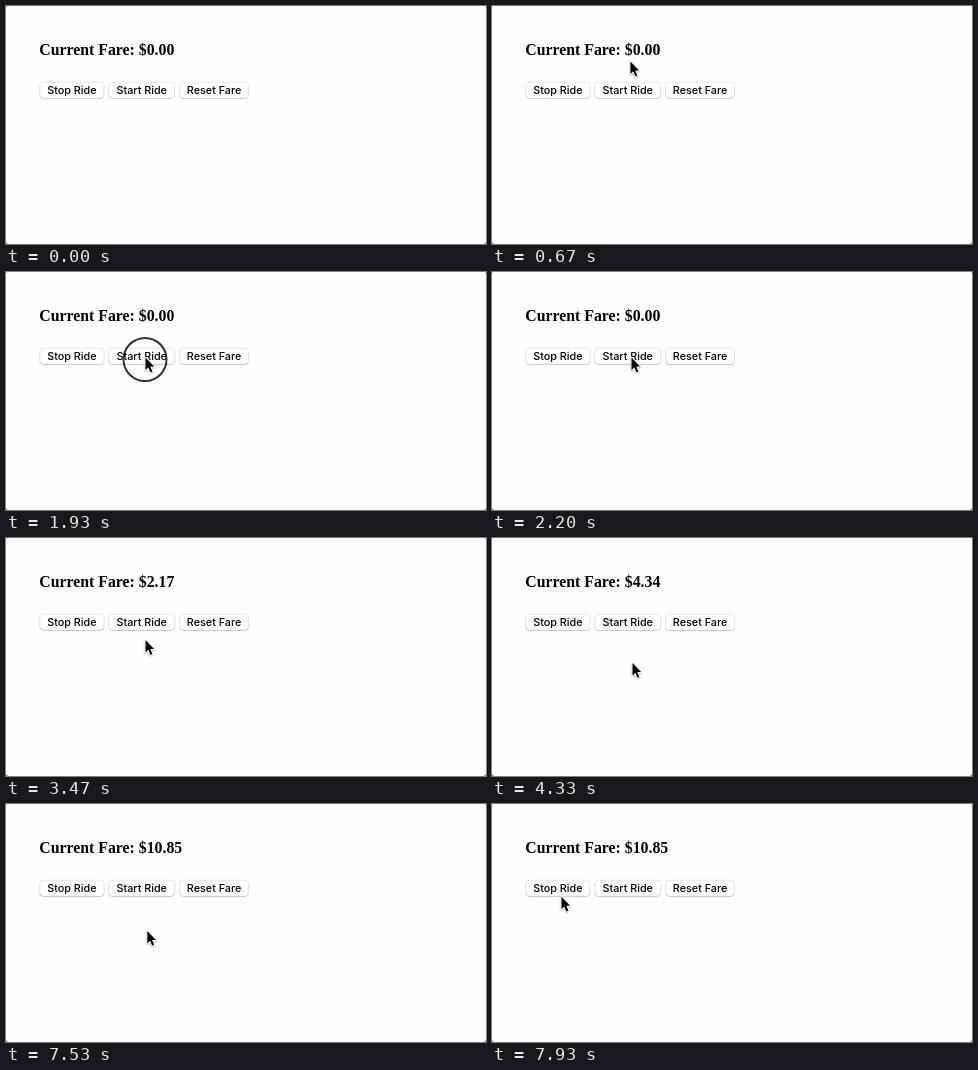
Animation of 480 by 238 pixels, one loop 8 s. Source, as an HTML page with a canvas:

```html
<!DOCTYPE html>
<html lang="en">
<head>
<meta charset="utf-8">
<title>Fare meter</title>
<style>
  html, body { margin: 0; width: 100%; height: 100%; overflow: hidden; background: #fefdff; }
  canvas { display: block; width: 480px; height: 238px; }
</style>
</head>
<body>
<canvas id="stage"></canvas>
<script>
const W = 480, H = 238, LOOP = 8000, FPS = 15;
const FARE_STEP = 2.17;

const canvas = document.getElementById('stage');
const ctx = canvas.getContext('2d');
const dpr = window.devicePixelRatio || 1;
canvas.width = W * dpr;
canvas.height = H * dpr;

const buttons = [
  { label: 'Stop Ride', x: 33.8, w: 64.2 },
  { label: 'Start Ride', x: 102.7, w: 66 },
  { label: 'Reset Fare', x: 173.7, w: 68.7 }
];

// Pointer strokes: [tick, x, y], smooth inside a stroke, still between strokes
const strokes = [
  [[1, 210, 262], [3, 205.5, 232], [6, 186, 160], [9, 150, 76], [11, 130, 44.5],
   [13, 130, 60], [15, 139, 89.5], [18, 139.5, 85.5]],
  [[45, 139.5, 85.5], [52, 139.5, 102], [58, 140.5, 120], [65, 140.5, 125]],
  [[112, 140.5, 125], [114, 137, 126.5], [119, 69.5, 92.7]]
];

function slope(keys, i, axis) {
  const a = keys[i - 1], b = keys[i + 1];
  return a && b ? (b[axis] - a[axis]) / (b[0] - a[0]) : 0;
}

function hermite(keys, i, axis, tick) {
  const a = keys[i], b = keys[i + 1], span = b[0] - a[0];
  const s = (tick - a[0]) / span, s2 = s * s, s3 = s2 * s;
  return (2 * s3 - 3 * s2 + 1) * a[axis] + (3 * s2 - 2 * s3) * b[axis] +
    span * ((s3 - 2 * s2 + s) * slope(keys, i, axis) + (s3 - s2) * slope(keys, i + 1, axis));
}

function pointerAt(tick) {
  let keys = strokes[0];
  for (const s of strokes) if (tick >= s[0][0]) keys = s;
  const last = keys[keys.length - 1];
  if (tick >= last[0]) return [last[1], last[2]];
  let i = 0;
  while (keys[i + 1][0] <= tick) i++;
  return [hermite(keys, i, 1, tick), hermite(keys, i, 2, tick)];
}

function drawCorners() {
  ctx.fillStyle = '#b5b3b6';
  for (const x of [0, W - 1]) ctx.fillRect(x, 0, 1, 1);
  ctx.fillStyle = '#6f6d70';
  for (const x of [0, W - 1]) ctx.fillRect(x, H - 1, 1, 1);
  ctx.fillStyle = '#c9c7ca';
  for (const x of [0, W - 1]) ctx.fillRect(x, H - 2, 1, 1);
  for (const x of [1, W - 2]) ctx.fillRect(x, H - 1, 1, 1);
}

function box(x, y, w, h) {
  ctx.beginPath();
  ctx.roundRect(x, y, w, h, 3.5);
}

function drawLabel(b, color) {
  ctx.fillStyle = color;
  ctx.font = '500 10.8px Inter, Roboto, sans-serif';
  ctx.textAlign = 'center';
  ctx.fillText(b.label, b.x + b.w / 2, 88.2);
}

function drawButton(b, press) {
  box(b.x, 76.2, b.w, 16.2);
  ctx.fillStyle = '#fff';
  ctx.fill();
  const edge = ctx.createLinearGradient(0, 76, 0, 93);
  edge.addColorStop(0, '#e6e5e7');
  edge.addColorStop(0.7, '#dddcde');
  edge.addColorStop(1, '#c4c3c5');
  ctx.strokeStyle = edge;
  ctx.lineWidth = 1;
  ctx.stroke();
  drawLabel(b, '#000');
  if (!press) return;
  ctx.globalAlpha = press;
  const blue = ctx.createLinearGradient(0, 76, 0, 93);
  blue.addColorStop(0, '#5fa8f8');
  blue.addColorStop(1, '#1468e6');
  box(b.x - 0.5, 75.7, b.w + 1, 17.2);
  ctx.fillStyle = blue;
  ctx.fill();
  drawLabel(b, '#fff');
  ctx.globalAlpha = 1;
}

function drawRing() {
  ctx.beginPath();
  ctx.arc(139, 87.5, 21.5, 0, Math.PI * 2);
  ctx.strokeStyle = 'rgba(0, 0, 0, 0.8)';
  ctx.lineWidth = 2;
  ctx.stroke();
}

function drawPointer(x, y) {
  const arrow = new Path2D('M0 0V12.4L2.8 9.8L4.9 14.8L6.9 13.9L4.8 9.1H8.6Z');
  ctx.save();
  ctx.translate(x, y);
  ctx.lineJoin = 'round';
  ctx.lineWidth = 1.8;
  ctx.strokeStyle = '#fff';
  ctx.shadowColor = 'rgba(0, 0, 0, 0.35)';
  ctx.shadowBlur = 1.5 * dpr;
  ctx.shadowOffsetY = 0.7 * dpr;
  ctx.stroke(arrow);
  ctx.shadowColor = 'transparent';
  ctx.fillStyle = '#000';
  ctx.fill(arrow);
  ctx.restore();
}

function draw(time) {
  const tick = Math.floor(time * FPS / 1000 + 0.06);
  const within = (from, to) => tick >= from && tick < to;

  ctx.setTransform(dpr, 0, 0, dpr, 0, 0);
  ctx.fillStyle = '#fefdff';
  ctx.fillRect(0, 0, W, H);
  drawCorners();

  // The meter starts on release and ticks once a second
  const fare = FARE_STEP * Math.max(0, Math.floor((tick - 33) / FPS));
  ctx.fillStyle = '#000';
  ctx.font = 'bold 15.8px "Liberation Serif", Times, serif';
  ctx.textAlign = 'left';
  ctx.fillText('Current Fare: $' + fare.toFixed(2), 33.3, 49.2);

  const press = within(30, 32) ? 1 : within(32, 33) ? 0.4 : 0;
  buttons.forEach((b, i) => drawButton(b, i === 1 ? press : 0));

  if (within(21, 26) || within(29, 33)) drawRing();
  if (tick >= 3) drawPointer(...pointerAt(tick));
}

const start = performance.now();
function loop() {
  draw((performance.now() - start) % LOOP);
  requestAnimationFrame(loop);
}
loop();
</script>
</body>
</html>
```
